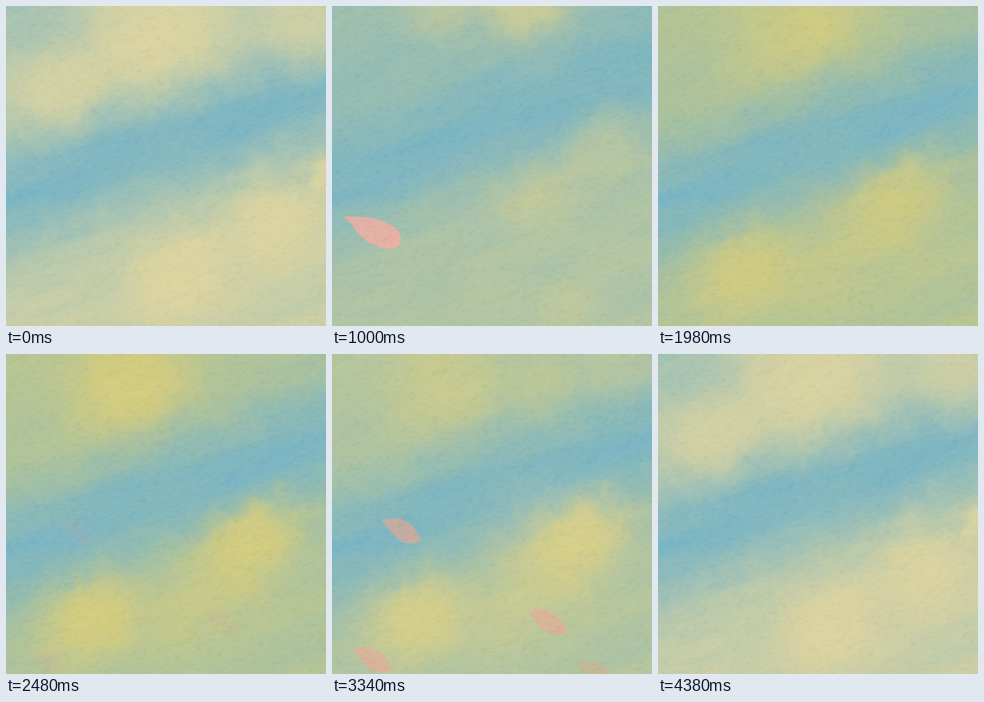
Write an HTML page with a canvas that moves like this. It is 320 by 320 pixels and loops after 4.44 s.

```html
<!DOCTYPE html>
<html lang="en">
<head>
<meta charset="utf-8">
<title>Painted sky</title>
<style>
html, body { margin: 0; height: 100%; overflow: hidden; background: #7cb8c4; }
canvas { display: block; width: 100%; height: 100%; }
</style>
</head>
<body>
<canvas id="stage" width="320" height="320"></canvas>
<script>
const SIZE = 320, SCENE_MS = 740, HOLD_MS = 200, STEP_MS = 60;
const SLOPE = 0.36; // brush strokes and cloud banks rise to the right
const SKY = [122, 181, 196];
const ctx = document.getElementById('stage').getContext('2d');

const leafShape = new Path2D('M-.5 -.08 Q-.12 -.36 .2 -.17 Q.36 -.05 .5 .06 Q.2 .32 -.08 .18 Q-.26 .1 -.5 -.08Z');
const dropShape = new Path2D('M-.5 0 C-.2 -.14 .05 -.24 .36 -.18 Q.52 -.1 .5 .04 Q.46 .17 .22 .19 C0 .21 -.1 .16 -.24 .1 Q-.32 .02 -.5 0Z');

function hash(x, y) {
  let h = Math.imul(x, 374761393) + Math.imul(y, 668265263);
  h = Math.imul(h ^ (h >>> 13), 1274126177);
  return ((h ^ (h >>> 16)) >>> 0) / 4294967296;
}

const smooth = t => t * t * (3 - 2 * t);
const mix = (a, b, t) => a + (b - a) * t;

// Value noise in -0.5..0.5
function noise(x, y) {
  const i = Math.floor(x), j = Math.floor(y), u = smooth(x - i), v = smooth(y - j);
  return mix(mix(hash(i, j), hash(i + 1, j), u), mix(hash(i, j + 1), hash(i + 1, j + 1), u), v) - 0.5;
}

const ragged = (x, y) => 12 * noise(x / 26, y / 26) + 9 * noise(x / 8, y / 8);

function paint(pixel) {
  const canvas = document.createElement('canvas');
  canvas.width = canvas.height = SIZE;
  const c = canvas.getContext('2d'), img = c.createImageData(SIZE, SIZE);
  for (let y = 0, n = 0; y < SIZE; y++)
    for (let x = 0; x < SIZE; x++, n += 4) img.data.set(pixel(x, y), n);
  c.putImageData(img, 0, 0);
  return canvas;
}

// A blue valley starts at the left edge at height `valley`; haze thickens
// away from it. Puffs are [x, y, radius, strength]; below zero clears haze.
function scene(cloud, valley, above, below, puffs, ...petals) {
  const canvas = paint((x, y) => {
    const wx = x + ragged(x, y), wy = y + ragged(x + 400, y);
    const off = (wy + SLOPE * wx - valley) / 65;
    let clear = 1 - (off < 0 ? above : below) * (1 - Math.exp(-off * off))
      - 0.06 - 0.12 * noise((x - SLOPE * y) / 60, (y + SLOPE * x) / 14);
    for (const [px, py, r, strength = 0.8] of puffs) {
      const a = (wx - px) / r / 1.2, b = (wy - py + 0.15 * (wx - px)) / r;
      clear *= 1 - strength * Math.exp(-((a * a + b * b) ** 1.5));
    }
    return [...SKY.map((v, i) => mix(cloud[i], v, Math.min(1, clear))), 255];
  });
  petals.forEach(draw => draw(canvas.getContext('2d')));
  return canvas;
}

const petal = (shape, x, y, length, angle, colour) => c => {
  c.save();
  c.translate(x, y);
  c.rotate(angle);
  c.scale(length, length);
  c.fillStyle = colour;
  c.fill(shape);
  c.restore();
};
const leaf = (x, y) => petal(leafShape, x, y, 45, 0.32, '#e8a88f');

const cream = [225, 214, 158], pale = [217, 208, 146], gold = [221, 207, 120];
const lowBank = [[245, 187, 42], [85, 267, 44], [195, 240, 50, 0.45]];

const scenes = [
  scene(cream, 192, 0.65, 0.7, [
    [155, 28, 62], [50, 80, 40, 0.6], [305, 20, 46, 0.6], [25, 8, 48, -1],
    [175, 270, 48], [270, 215, 42], [322, 168, 16]
  ]),
  scene(pale, 172, 0.3, 0.5, [
    [195, -8, 38], [110, 0, 30, 0.5], [265, 138, 36, 0.45], [205, 188, 36, 0.45],
    [238, 308, 28, 0.4]
  ], petal(dropShape, 39, 223.5, 64, 0.43, '#edb0a3')),
  scene(gold, 196, 0.45, 0.6, [
    [185, 2, 48], [215, 205, 42, 0.45], [100, 270, 60, 0.4]
  ]),
  scene(gold, 198, 0.55, 0.5, [[125, 28, 52], ...lowBank]),
  scene(gold, 198, 0.55, 0.5, [[112, 30, 48], [205, 25, 26, 0.5], ...lowBank],
    leaf(70, 177), leaf(216, 268), leaf(41, 306)),
  scene(cream, 190, 0.5, 0.5, [[225, 170, 52], [290, 10, 40, 0.5], ...lowBank],
    leaf(264, 320))
];

// Paper relief: fine slanted fibres, lightening or darkening
const paper = paint((x, y) => {
  const u = x - y * SLOPE, v = y + x * SLOPE;
  const n = noise(u / 5, v / 2) + 0.8 * noise(u / 3 + 90, v / 1.5) + 0.1;
  const tone = n > 0 ? 255 : 0;
  return [tone, tone, tone, Math.abs(n) * 12];
});

function draw(now) {
  const t = now % (SCENE_MS * scenes.length);
  const k = Math.floor(t / SCENE_MS);
  const step = Math.floor((t % SCENE_MS - HOLD_MS) / STEP_MS) + 1;
  ctx.globalAlpha = 1;
  ctx.drawImage(scenes[k], 0, 0);
  if (step > 0) {
    ctx.globalAlpha = smooth(step / 10);
    ctx.drawImage(scenes[(k + 1) % scenes.length], 0, 0);
    ctx.globalAlpha = 1;
  }
  ctx.drawImage(paper, 0, 0);
}

const start = performance.now();
function tick() {
  draw(performance.now() - start);
  requestAnimationFrame(tick);
}
tick();
</script>
</body>
</html>
```
